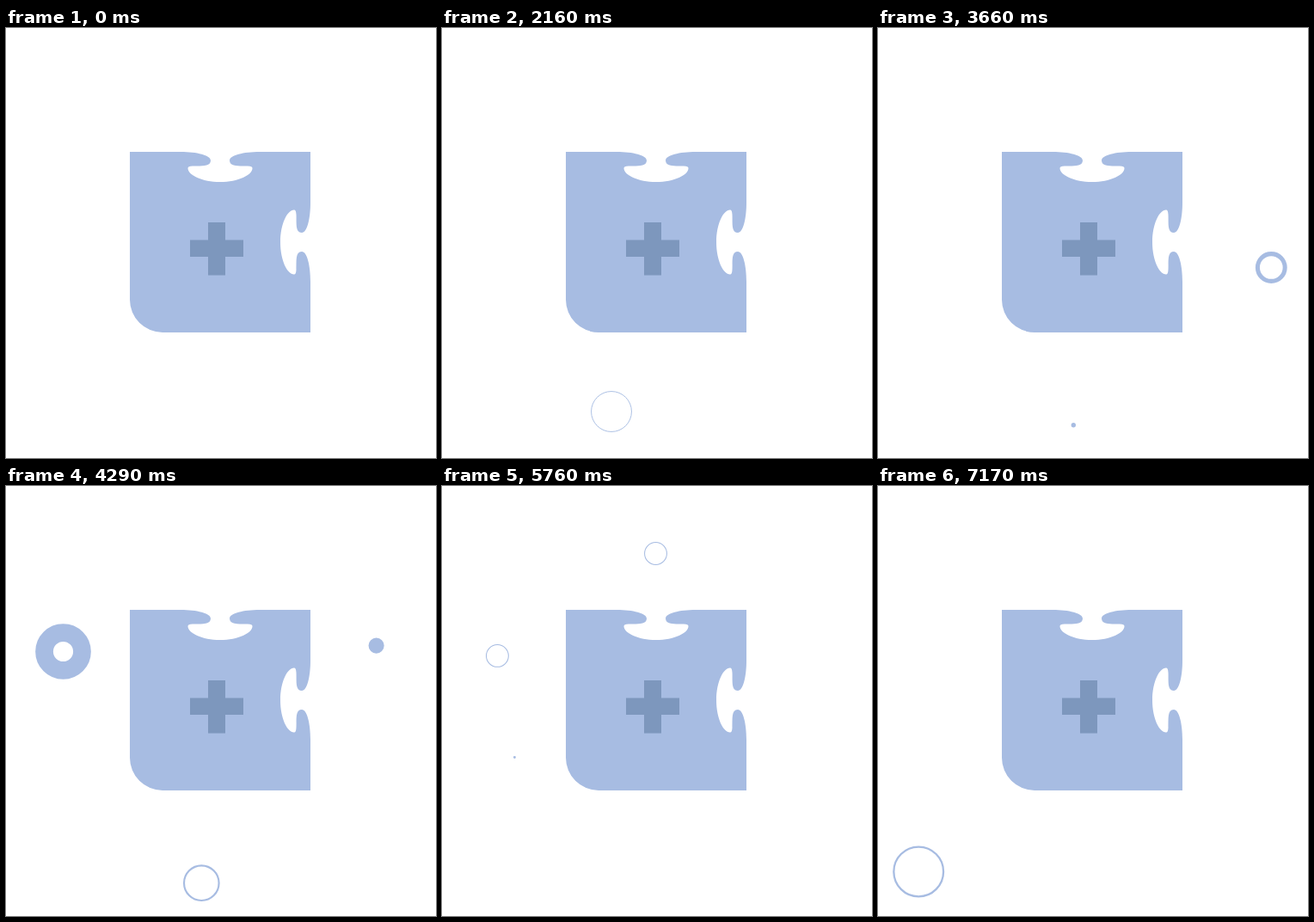
Animation, 500 px wide and 500 px high, one loop 7200 ms. Source, as an HTML page without scripts:

```html
<!DOCTYPE html>
<html lang="en">
<head>
<meta charset="utf-8">
<title>Puzzle piece</title>
<style>
  /* clock in ms, inherited by every ring */
  @property --t { syntax: "<number>"; inherits: true; initial-value: 0; }

  html, body { margin: 0; width: 100%; height: 100%; overflow: hidden; background: #fff; }
  svg { display: block; width: 100%; height: 100%; animation: clock 7200ms linear infinite; }
  @keyframes clock { from { --t: 0; } to { --t: 7200; } }

  .piece { fill: #a7bce2; }
  .plus { fill: #7d97bd; }

  /* --s start, --d duration, --r final radius, --h share of time before the hole opens */
  .rings circle {
    --h: .65;
    --p: clamp(0, (var(--t) - var(--s)) / var(--d), 1);
    --out: (var(--p) * var(--r));
    --in: (max(0, (var(--p) - var(--h)) / (1 - var(--h))) * var(--r));
    r: calc((var(--out) + var(--in)) / 2 * 1px);
    stroke-width: calc(max(0, var(--out) - var(--in)) * 1px);
    fill: none;
    stroke: #a7bce2;
  }
</style>
</head>
<body>
<svg viewBox="0 0 500 500">
  <path class="piece" d="M144 144H203C222 144 238 148 238 154C238 162 226 160 217 160.5
    C213 160.7 211.5 161.5 211.5 163C211.5 171 228 179 249 179C270 179 286.5 171 286.5 163
    C286.5 161.5 285 160.7 281 160.5C272 160 260 162 260 154C260 148 276 144 295 144H354
    V203C354 222 350 238 344 238C336 238 338 226 337.5 217C337.3 213 336.5 211.5 335 211.5
    C327 211.5 319 228 319 249C319 270 327 286.5 335 286.5C336.5 286.5 337.3 285 337.5 281
    C338 272 336 260 344 260C350 260 354 276 354 295V354H182A38 38 0 0 1 144 316Z"/>
  <path class="plus" d="M235 226h20v20.5h21v19.5h-21v21.5h-20v-21.5h-21v-19.5h21z"/>

  <g class="rings">
    <circle cx="377" cy="80.6" style="--s:600;--d:550;--r:13.7;--h:.6"/>
    <circle cx="446.7" cy="55.6" style="--s:645;--d:705;--r:46.2"/>
    <circle cx="197" cy="446" style="--s:1327;--d:872;--r:25;--h:.46"/>
    <circle cx="72" cy="190" style="--s:1400;--d:690;--r:37"/>
    <circle cx="62" cy="53" style="--s:2260;--d:600;--r:40"/>
    <circle cx="400" cy="110" style="--s:2290;--d:550;--r:35"/>
    <circle cx="457.3" cy="278.5" style="--s:2850;--d:911;--r:20.7;--h:.69"/>
    <circle cx="227.3" cy="461.7" style="--s:3570;--d:760;--r:22.5"/>
    <circle cx="66.5" cy="192.5" style="--s:3845;--d:600;--r:43.5"/>
    <circle cx="430.6" cy="185.6" style="--s:4033;--d:867;--r:30.5;--h:.79"/>
    <circle cx="150" cy="70" style="--s:4810;--d:680;--r:47"/>
    <circle cx="64.4" cy="197.4" style="--s:4830;--d:990;--r:14.3;--h:.55"/>
    <circle cx="248.5" cy="78.5" style="--s:4830;--d:990;--r:14.3;--h:.55"/>
    <circle cx="84.4" cy="315.5" style="--s:5722;--d:800;--r:30"/>
    <circle cx="170" cy="402" style="--s:5900;--d:600;--r:27"/>
    <circle cx="419" cy="356" style="--s:6120;--d:690;--r:46"/>
    <circle cx="47.2" cy="448.4" style="--s:6590;--d:600;--r:31;--h:.7"/>
  </g>
</svg>
</body>
</html>
```
